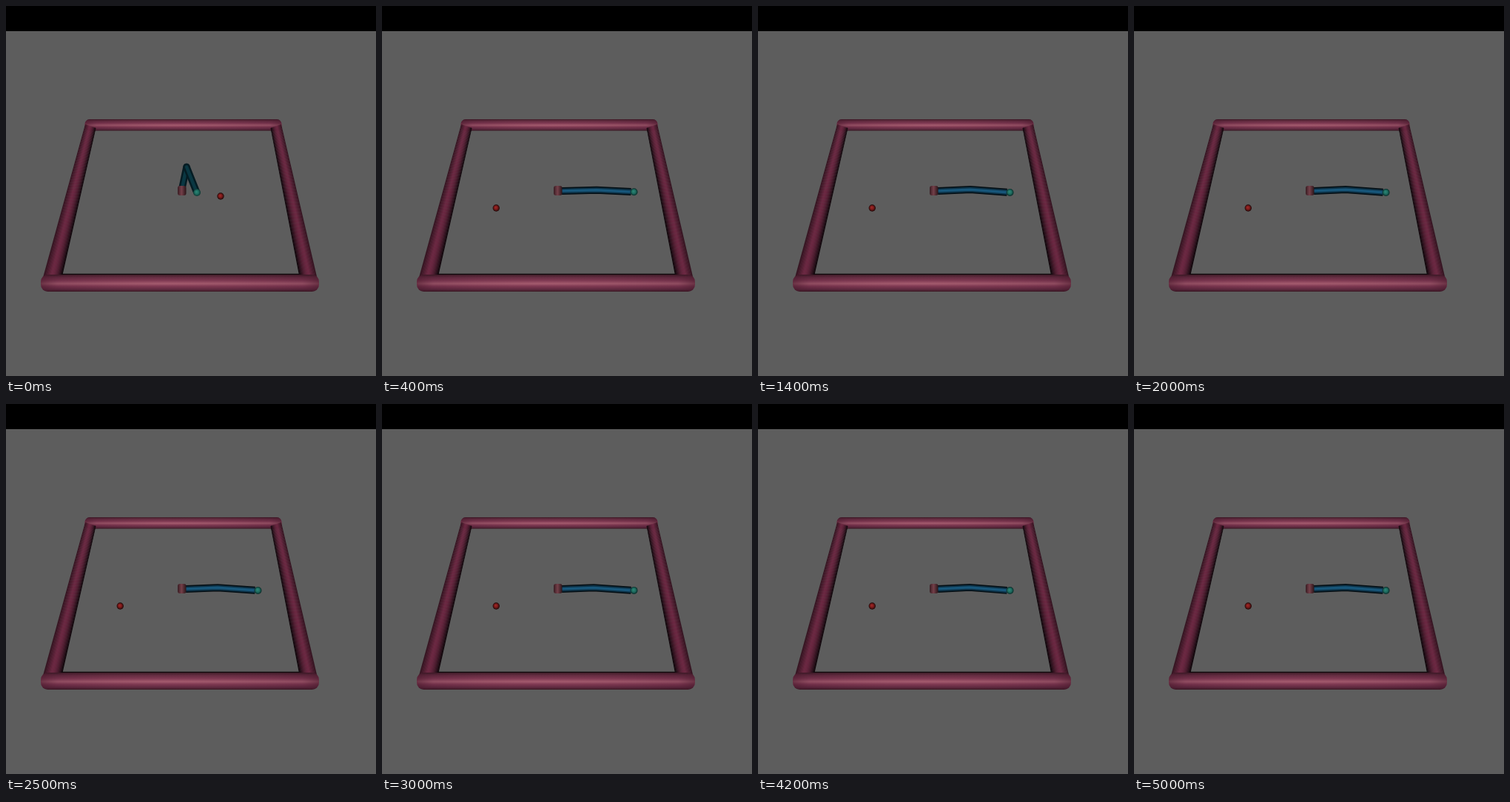
Write an HTML page with a canvas that moves like this. It is 500 by 500 pixels and loops after 5100 ms.

```html
<!DOCTYPE html>
<html lang="en">
<head>
<meta charset="utf-8">
<title>Two-link arm</title>
<style>
html, body { margin: 0; width: 100%; height: 100%; overflow: hidden; background: #000; }
canvas { display: block; width: 500px; height: 500px; }
</style>
</head>
<body>
<canvas id="stage" width="500" height="500"></canvas>
<script>
const ctx = document.getElementById('stage').getContext('2d');
const LOOP = 5100, STEP = 100;
const lerp = (a, b, k) => a + (b - a) * k;
const between = (p, q, k) => [lerp(p[0], q[0], k), lerp(p[1], q[1], k)];

function ramp(x0, y0, x1, y1, stops) {
  const g = ctx.createLinearGradient(x0, y0, x1, y1);
  stops.forEach(([at, color]) => g.addColorStop(at, color));
  return g;
}

function polygon(points, fill) {
  ctx.beginPath();
  points.forEach(p => ctx.lineTo(...p));
  ctx.closePath();
  ctx.fillStyle = fill;
  ctx.fill();
}

function line(points, width, color, cap = 'round') {
  ctx.beginPath();
  points.forEach(p => ctx.lineTo(...p));
  ctx.lineWidth = width;
  ctx.lineCap = cap;
  ctx.lineJoin = 'round';
  ctx.strokeStyle = color;
  ctx.stroke();
}

function ball(x, y, r, light, mid, dark) {
  const g = ctx.createRadialGradient(x - r * .15, y - r * .2, 0, x, y, r);
  g.addColorStop(0, light);
  g.addColorStop(.55, mid);
  g.addColorStop(1, dark);
  ctx.beginPath();
  ctx.arc(x, y, r, 0, Math.PI * 2);
  ctx.fillStyle = g;
  ctx.fill();
}

// Tapered tube in thin strips, lit on its outer half and black along its inner edge.
function sideRail(outerFar, innerFar, outerNear, innerNear) {
  const strips = 20;
  for (let i = 0; i < strips; i++) {
    const a = i / strips, b = Math.min(1, (i + 1.4) / strips), mid = (i + .5) / strips;
    const shade = mid < .4 ? lerp(.4, 1, mid / .4) : Math.cos((mid - .4) / .6 * Math.PI / 2);
    const color = `rgb(${lerp(10, 108, shade)},${lerp(5, 40, shade)},${lerp(8, 66, shade)})`;
    polygon([between(outerFar, innerFar, a), between(outerFar, innerFar, b),
      between(outerNear, innerNear, b), between(outerNear, innerNear, a)], color);
  }
}

function crossRail(x0, x1, y0, y1) {
  const r = (y1 - y0) / 2;
  ctx.beginPath();
  ctx.roundRect(x0, y0, x1 - x0, y1 - y0, r * .85);
  ctx.fillStyle = ramp(0, y0, 0, y1, [
    [0, '#30151f'], [.15, '#5a263b'], [.35, '#7a3550'], [.53, '#a35b6f'],
    [.68, '#7a3550'], [.87, '#55233a'], [1, '#2b121b']
  ]);
  ctx.fill();
  ctx.fillStyle = ramp(x0, 0, x1, 0, [
    [0, 'rgba(70,25,42,.6)'], [.06, 'rgba(90,35,55,.25)'],
    [.45, 'rgba(180,100,110,.1)'], [.94, 'rgba(90,35,55,.25)'], [1, 'rgba(70,25,42,.6)']
  ]);
  ctx.fill();
}

function scene() {
  ctx.fillStyle = '#000';
  ctx.fillRect(0, 0, 500, 500);
  ctx.fillStyle = '#5d5d5d';
  ctx.fillRect(0, 34, 500, 466);
  crossRail(106.5, 372.5, 153, 168.5);
  sideRail([107, 160], [121.5, 165], [48, 374], [74, 374]);
  sideRail([372, 160], [357.5, 165], [422, 374], [398, 374]);
  line([[75, 362.5], [396, 362.5]], 1.6, '#0e070a', 'butt');
  crossRail(47, 423, 363, 386);
}

function rootPost() {
  ctx.beginPath();
  ctx.roundRect(232, 243, 11.5, 13, 3);
  ctx.fillStyle = ramp(232, 0, 243.5, 0, [[0, '#381c22'], [.45, '#74404a'], [1, '#2a1518']]);
  ctx.fill();
}

function target(x, y) {
  ball(x, y, 4.7, '#a82a28', '#741818', '#1a0707');
}

function foldedPose() {
  const elbow = [244, 217.5];
  for (const end of [[238, 246], [257, 250]]) {
    line([elbow, end], 9.5, '#051c23');
    line([elbow, end], 4.5, '#0a3742');
  }
  rootPost();
  ball(258, 252, 5, '#2d8a78', '#1d6a5e', '#0c3631');
  target(290, 257);
}

function extendedPose(t) {
  const settle = Math.min(1, Math.max(0, (t - 700) / 900));
  const sway = Math.sin((t - 2000) / 520) * .25 * settle;
  const elbow = [lerp(290, 286, settle), lerp(248.8, 248.1, settle) + sway];
  const tip = [340.5, lerp(251.3, 252, settle) - sway * .4];
  const arm = [[243, 249.9], elbow, [tip[0] - 4, tip[1] - .2]];
  line(arm, 10, '#040d12', 'butt');
  line(arm, 7, '#0c3146', 'butt');
  line(arm, 3.4, '#17567a', 'butt');
  rootPost();
  ball(...tip, 5, '#2d8a78', '#1d6a5e', '#0a2a27');
  target(154.3, 273);
}

const start = performance.now();
function frame(now) {
  const t = Math.floor((Math.max(0, now - start) % LOOP) / STEP) * STEP;
  scene();
  if (t < STEP) foldedPose();
  else extendedPose(t);
  requestAnimationFrame(frame);
}
frame(start);
</script>
</body>
</html>
```
